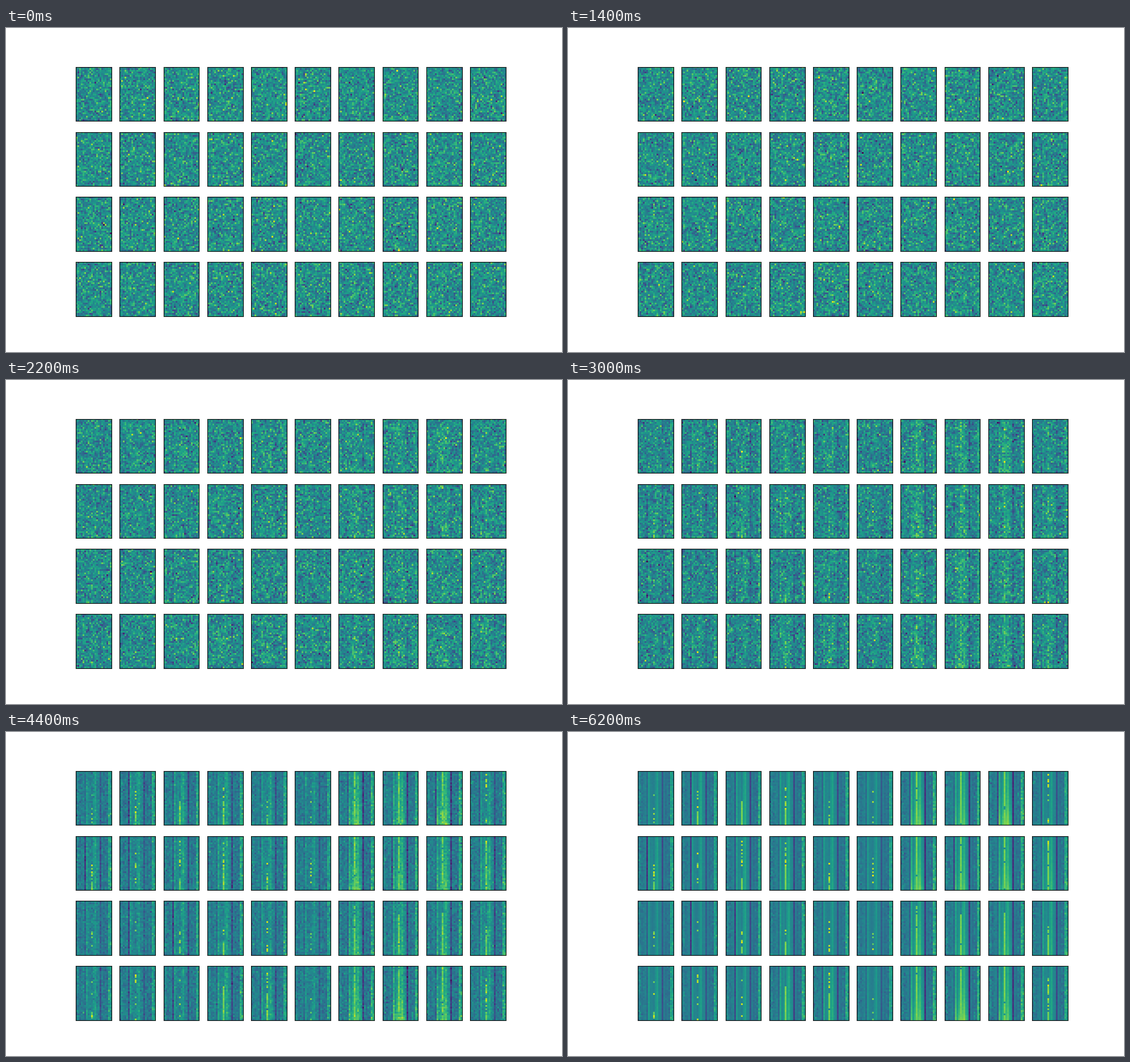
Write a matplotlib script that moves like this. It is 980 by 572 pixels and loops after 6.4 s.

```python
import numpy as np
import matplotlib.pyplot as plt
from matplotlib.animation import FuncAnimation

GRID_ROWS, GRID_COLS = 4, 10
ROWS, COLS = 32, 21
N_FRAMES, INTERVAL = 32, 200
LIMIT = 4.1            # colour scale runs from -LIMIT to LIMIT
SETTLED = 25           # frame at which the noise is practically gone
LEFT, CENTRE, RIGHT = 5, 9, 14     # dark line, bright line, dark line
rng = np.random.default_rng(11)

depth = np.linspace(0, 1, ROWS)[:, None]
col = np.arange(COLS)
in_band = (col >= 6) & (col <= 13)
edge = np.abs(col - 10) / 10

# Column brightness as a fraction of the colour scale.
base = .42 + .12 * np.clip(col - 18, 0, 1) + .03 * np.sin(2.1 * col)
base[[6, 11]] = .51
base[[16, 18]] = .37
band = in_band * (.14 + .1 * np.cos(np.pi * col)) * np.exp(-((col - 9) / 4) ** 2)
band[11] = .2
grain = .01 + .06 * edge ** 3

# Typical band strength across the grid, growing towards the right.
typical = np.interp(np.arange(GRID_COLS), [0, 2, 3.4, 5, 6, 8, 9],
                    [.2, .34, .52, .2, .64, .7, .48])


def clean_panel(strength):
    """Fully resolved picture of one panel, in units of the noise."""
    glow = max(strength - .45, 0) * depth ** 2.5
    img = base + strength * band * (.8 + .35 * depth) + .45 * glow * in_band
    img[:, LEFT] = .36 - .2 * rng.random() ** 3
    img[:, RIGHT] = .33 - .26 * strength
    img[:, 19:] += .1 * strength * (.4 + depth)
    img += rng.normal(size=img.shape) * grain * (.65 + .5 * strength)
    img[:, 17] += .12 * strength * (rng.random(ROWS) < .3)

    # A solid line at the bottom, scattered bright cells above it.
    start = int(ROWS * np.clip((.62 - strength) / .28, 0, 1))
    row = np.arange(ROWS)
    first = rng.uniform(0, 20)
    chance = rng.random(ROWS)
    solid = (row >= start) & (chance > .04)
    dots = (row < start) & (row > first) & (chance < .1 + .7 * strength)
    img[solid, CENTRE] = .79 + rng.normal(0, .012, solid.sum())
    img[dots, CENTRE] = rng.uniform(.74, .96, dots.sum())
    return (np.clip(img, 0, 1) - .5) * 2 * LIMIT


def signal_share(frame):
    """Share of signal variance under a linear noise schedule."""
    t = max(1 - frame / SETTLED, .008 * (N_FRAMES - 1 - frame) / 6)
    return np.exp(-.1 * t - 9.95 * t * t)


def noise_history(x):
    """Add noise step by step from the last frame back to the first."""
    states = [x]
    for frame in range(N_FRAMES - 2, -1, -1):
        keep = signal_share(frame) / signal_share(frame + 1)
        x = np.sqrt(keep) * x + np.sqrt(1 - keep) * rng.normal(size=x.shape)
        states.append(x)
    return states[::-1]


strengths = np.clip(typical + rng.normal(0, .1, (GRID_ROWS, GRID_COLS)), 0, .95)
states = noise_history(np.array([clean_panel(s) for s in strengths.flat]))

fig, axes = plt.subplots(GRID_ROWS, GRID_COLS, figsize=(9.8, 5.72), dpi=100,
                         facecolor="white")
fig.subplots_adjust(left=.12485, right=.89965, bottom=.11, top=.88,
                    wspace=.2, hspace=.2)
images = []
for ax, panel in zip(axes.flat, states[0]):
    ax.set_xticks([])
    ax.set_yticks([])
    images.append(ax.imshow(panel, cmap="viridis", vmin=-LIMIT, vmax=LIMIT,
                            interpolation="nearest"))


def update(frame):
    for image, panel in zip(images, states[frame]):
        image.set_data(panel)
    return images


anim = FuncAnimation(fig, update, frames=N_FRAMES, interval=INTERVAL,
                     repeat=True, repeat_delay=0, blit=False)
plt.show()
```
